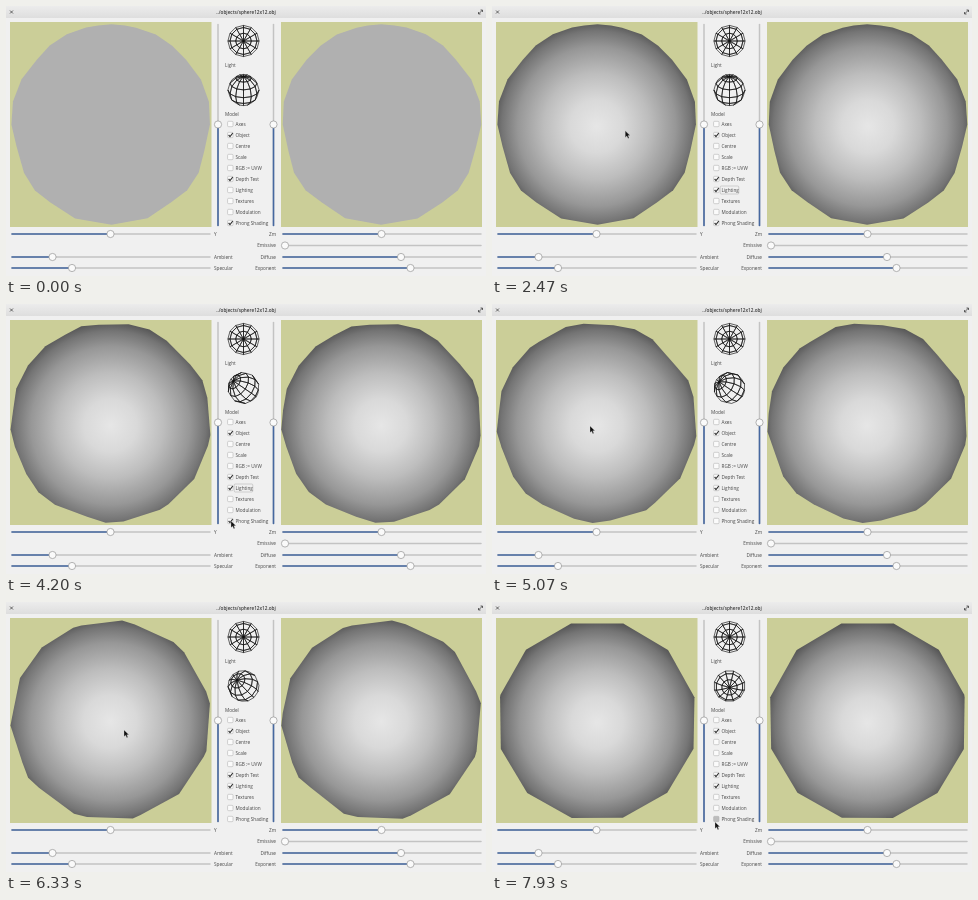
An HTML page that plays this animation: 480 px wide and 270 px high, repeating every 8000 ms.

```html
<!DOCTYPE html>
<html lang="en">
<head>
<meta charset="utf-8">
<title>Sphere viewer</title>
<style>
  html, body { margin: 0; width: 100%; height: 100%; overflow: hidden; background: #f0f0f0; }
  svg { display: block; width: 480px; height: 270px; }
  text { font: 4.7px "Open Sans", "Noto Sans", sans-serif; fill: #444; }
  .title { font-weight: 600; text-anchor: middle; fill: #3c3c3c; }
  .end { text-anchor: end; }
  .wire { fill: none; stroke: #111; stroke-width: .65; stroke-linejoin: round; }
  .trough { stroke: #c3c3c3; stroke-width: 1.5; stroke-linecap: round; }
  .filled { stroke: #4668a0; stroke-width: 1.6; stroke-linecap: round; }
  .knob { fill: #fafafa; stroke: #969696; stroke-width: .7; }
  .box { fill: #fbfbfb; stroke: #b4b4b4; stroke-width: .6; }
  .tick { fill: none; stroke: #333; stroke-width: 1.15; }
  .icon { fill: none; stroke: #444; stroke-width: .8; }
</style>
</head>
<body>
<svg id="stage" viewBox="0 0 480 270">
  <defs>
    <linearGradient id="bar" x2="0" y2="1">
      <stop stop-color="#ececec"/><stop offset="1" stop-color="#dedede"/>
    </linearGradient>
    <radialGradient id="lit" cx=".5" cy=".51" r=".53">
      <stop stop-color="#e6e6e6"/>
      <stop offset=".25" stop-color="#d9d9d9"/>
      <stop offset=".5" stop-color="#bdbdbd"/>
      <stop offset=".75" stop-color="#979797"/>
      <stop offset=".9" stop-color="#747474"/>
      <stop offset="1" stop-color="#505050"/>
    </radialGradient>
  </defs>
  <rect width="480" height="270" fill="#f0f0f0"/>
  <rect width="480" height="12" fill="url(#bar)"/>
  <text class="title" x="240" y="7.8">../objects/sphere12x12.obj</text>
  <path class="icon" d="M4 4.5l3 3M7 4.5l-3 3M472.5 8l4-4M474.5 4h2v2M472.5 6v2h2"/>
  <rect x="4" y="16" width="201.5" height="205" fill="#cbce98"/>
  <rect x="275" y="16" width="201" height="205" fill="#cbce98"/>
  <polygon id="leftBall"/>
  <polygon id="rightBall"/>
  <path id="lightGlobe" class="wire"/>
  <path id="modelGlobe" class="wire"/>
  <text x="219" y="61.3">Light</text>
  <text x="219" y="109.7">Model</text>
  <g id="controls"></g>
  <rect id="focus" x="228.2" y="180" width="18.6" height="8" rx="1" fill="none" stroke="#aaa" stroke-width=".5"/>
  <path id="cursor" d="M0 0V6.6L1.6 5.2L2.8 7.8L3.9 7.3L2.8 4.8H4.9Z" fill="#111" stroke="#ddd" stroke-width=".3"/>
</svg>
<script>
const LOOP = 8000, STEP = 1000 / 15, RAD = Math.PI / 180;
const LIGHT_ON = 1860, PHONG_OFF = 4260, PHONG_HOVER = 7850;
const $ = id => document.getElementById(id);

// time, x, y of the pointer tip
const pointerKeys = [
  [67, 416, 253], [870, 240, 161], [1270, 234, 184], [1930, 231, 184],
  [2600, 122, 118], [3130, 94, 130], [3600, 92, 140], [4130, 225, 217],
  [4330, 225, 217], [4930, 96, 118], [5070, 98, 122], [5730, 138, 148],
  [6330, 118, 128], [6930, 123, 136], [7330, 140, 149], [7930, 223, 220]
];
// time, pole x, pole y, spin in degrees
const poseKeys = [
  [2600, 0, -.87, 0], [3130, -.5, -.72, 0], [3600, -.65, -.45, 4],
  [4930, -.65, -.45, 4], [5070, -.66, -.4, 5], [5730, -.03, .25, 22],
  [6330, -.42, -.38, 18], [6930, -.36, -.3, 18], [7330, 0, .1, 15]
];

function sample(keys, t) {
  if (t <= keys[0][0]) return keys[0].slice(1);
  const i = keys.findIndex(k => k[0] > t);
  if (i < 0) return keys[keys.length - 1].slice(1);
  const a = keys[i - 1], b = keys[i], u = (t - a[0]) / (b[0] - a[0]);
  const e = u * u * (3 - 2 * u);
  return a.slice(1).map((v, j) => v + (b[j + 1] - v) * e);
}

// Sphere point for a colatitude and longitude, tilted so its pole faces (px, py).
function spherePoint(lat, lon, [px, py, spin]) {
  const s = Math.sin(lat * RAD), angle = (lon + spin) * RAD;
  const x = s * Math.cos(angle), y = s * Math.sin(angle), z = Math.cos(lat * RAD);
  const c = Math.sqrt(1 - px * px - py * py);
  const k = (px * y - py * x) / (1 + c);
  return [x * c + px * z - py * k, y * c + py * z + px * k, z * c - py * y - px * x];
}

function hull(points) {
  points.sort((a, b) => a[0] - b[0] || a[1] - b[1]);
  const half = list => {
    const out = [];
    for (const p of list) {
      while (out.length > 1) {
        const [a, b] = out.slice(-2);
        if ((b[0] - a[0]) * (p[1] - a[1]) - (b[1] - a[1]) * (p[0] - a[0]) > 0) break;
        out.pop();
      }
      out.push(p);
    }
    return out.slice(0, -1);
  };
  return [...half(points), ...half([...points].reverse())];
}

function outline(cx, cy, radius, pose, yaw) {
  const points = [], c = Math.cos(yaw), s = Math.sin(yaw);
  for (let lat = 0; lat <= 180; lat += 15)
    for (let lon = 0; lon < 360; lon += 30) {
      const [x, y, z] = spherePoint(lat, lon, pose);
      const scale = radius / (1 - (z * c - x * s) / 6);
      points.push([cx + (x * c + z * s) * scale, cy + y * scale]);
    }
  return hull(points).map(p => p.map(v => v.toFixed(2)).join()).join(" ");
}

function wireGlobe(cx, cy, radius, pose) {
  let d = "";
  for (let lat = 0; lat < 180; lat += 30)
    for (let lon = 0; lon < 360; lon += 30) {
      if (spherePoint(lat + 15, lon + 15, pose)[2] < 0) continue;
      const corners = [[0, 0], [30, 0], [30, 30], [0, 30]].map(([a, b]) => {
        const [x, y] = spherePoint(lat + a, lon + b, pose);
        return (cx + x * radius).toFixed(2) + " " + (cy + y * radius).toFixed(2);
      });
      d += "M" + corners.join("L") + "Z";
    }
  return d;
}

function slider(x1, y1, x2, y2, kx, ky) {
  return `<path class="trough" d="M${x1} ${y1}L${x2} ${y2}"/>` +
    `<path class="filled" d="M${x1} ${y1}L${kx} ${ky}"/>` +
    `<circle class="knob" cx="${kx}" cy="${ky}" r="3.6"/>`;
}

function buildControls() {
  let html = "";
  for (const x of [212, 267.5]) html += slider(x, 219.5, x, 18.5, x, 118.5);
  for (const [y, knob, label] of [[228, 104.5, "Y"], [251, 46.5, "Ambient"], [262, 66, "Specular"]])
    html += slider(6, y, 204, y, knob, y) + `<text x="208" y="${y + 1.8}">${label}</text>`;
  for (const [y, knob, label] of [[228, 375.5, "Zm"], [239.5, 279, "Emissive"], [251, 395, "Diffuse"], [262, 404.5, "Exponent"]])
    html += slider(277, y, 475, y, knob, y) + `<text class="end" x="270" y="${y + 1.8}">${label}</text>`;
  const options = ["Axes", "Object", "Centre", "Scale", "RGB := UVW", "Depth Test",
    "Lighting", "Textures", "Modulation", "Phong Shading"];
  options.forEach((label, i) => {
    const y = 118 + i * 11;
    const shown = [1, 5, 6, 9].includes(i);
    html += `<rect id="box${i}" class="box" x="221.6" y="${y - 2.7}" width="5.4" height="5.4" rx="1"/>` +
      (shown ? `<path id="tick${i}" class="tick" d="M222.6 ${y}l1.4 1.6l2.8-3.6"/>` : "") +
      `<text x="229.5" y="${y + 1.7}">${label}</text>`;
  });
  $("controls").innerHTML = html;
}

function show(id, visible) {
  $(id).style.visibility = visible ? "visible" : "hidden";
}

function draw(t) {
  const pose = sample(poseKeys, t), [x, y] = sample(pointerKeys, t);
  const lit = t >= LIGHT_ON;
  $("leftBall").setAttribute("points", outline(105, 118.5, 99.3, pose, .02));
  $("rightBall").setAttribute("points", outline(375.7, 118.5, 99.3, pose, -.02));
  for (const id of ["leftBall", "rightBall"]) $(id).setAttribute("fill", lit ? "url(#lit)" : "#b0b0b0");
  $("modelGlobe").setAttribute("d", wireGlobe(237.5, 84, 15.6, pose));
  $("cursor").setAttribute("transform", `translate(${x.toFixed(2)} ${y.toFixed(2)})`);
  show("cursor", t >= 60);
  show("tick6", lit);
  show("tick9", t < PHONG_OFF);
  show("focus", lit && t < PHONG_OFF);
  $("box9").style.fill = t >= PHONG_HOVER ? "#bcbcbc" : "";
}

function frame() {
  const t = performance.now() % LOOP;
  draw(Math.floor(t / STEP + .1) * STEP);
  requestAnimationFrame(frame);
}

buildControls();
$("lightGlobe").setAttribute("d", wireGlobe(237.5, 35, 15.6, [0, 0, 0]));
frame();
</script>
</body>
</html>
```
